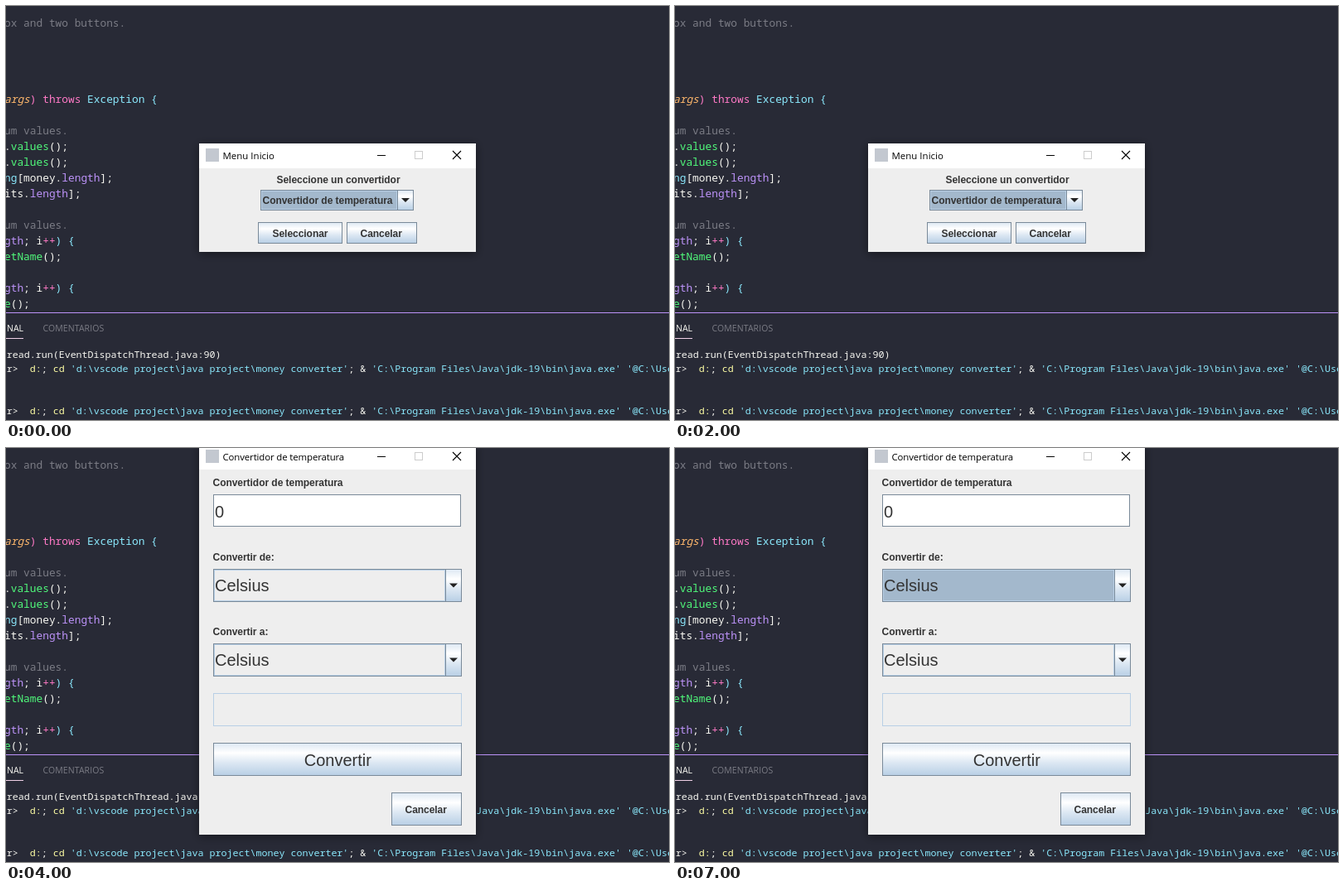
Recreate the animation shown at these times as an HTML page. Size 800x500 px, loop 8000 ms.

```html
<!DOCTYPE html>
<html lang="es">
<head>
<meta charset="utf-8">
<title>Convertidor</title>
<style>
  html, body { margin: 0; width: 100%; height: 100%; overflow: hidden; background: #282a36; }
  svg { display: block; width: 800px; height: 500px; }
  text { white-space: pre; }
  .code { font: 500 12.833px "Noto Sans Mono", monospace; }
  .term { font: 500 11.667px "Noto Sans Mono", monospace; }
  .tab { font: 10.5px "Open Sans", sans-serif; }
  .title { font: 11.4px "Open Sans", sans-serif; fill: #000; }
  .bold { font: bold 12px "Liberation Sans", Arial, sans-serif; fill: #333; letter-spacing: -.04px; }
  .big { font: 20px "Liberation Sans", Arial, sans-serif; fill: #333; }
</style>
</head>
<body>
<svg id="stage" viewBox="0 0 800 500">
  <defs>
    <linearGradient id="ocean" x1="0" y1="0" x2="0" y2="1">
      <stop offset="0" stop-color="#dde8f3"/>
      <stop offset=".3" stop-color="#fff"/>
      <stop offset=".6" stop-color="#dde8f3"/>
      <stop offset="1" stop-color="#b8cfe5"/>
    </linearGradient>
    <filter id="shadow" x="-20%" y="-20%" width="140%" height="140%">
      <feDropShadow dx="0" dy="2" stdDeviation="6" flood-color="#000" flood-opacity=".45"/>
    </filter>
  </defs>
</svg>
<script>
const stage = document.getElementById('stage');
const EDGE = '#7a8a99', PALE = '#b8cfe5', PICK = '#a3b8cc', PANEL = '#eeeeee';
const INK = {
  w: '#f8f8f2', c: '#8be9fd', g: '#50fa7b', p: '#ff79c6',
  v: '#bd93f9', o: '#ffb86c', y: '#ffffa5', m: '#7b7c85'
};

function make(parent, tag, attrs = {}, content) {
  const el = document.createElementNS('http://www.w3.org/2000/svg', tag);
  for (const key in attrs) el.setAttribute(key, attrs[key]);
  if (content !== undefined) el.textContent = content;
  parent.append(el);
  return el;
}

const group = (parent, attrs) => make(parent, 'g', attrs);
const fill = (parent, x, y, width, height, color) =>
  make(parent, 'rect', { x, y, width, height, fill: color });
const frame = (parent, x, y, w, h, stroke, inside = 'none') =>
  make(parent, 'rect', { x: x + .5, y: y + .5, width: w - 1, height: h - 1, fill: inside, stroke });
const label = (parent, cls, x, y, str, attrs = {}) =>
  make(parent, 'text', { class: cls, x, y, ...attrs }, str);

// Each run is [ink key, string]
function line(cls, x, y, ...runs) {
  const text = make(stage, 'text', { class: cls, x, y });
  for (const [ink, str] of runs) {
    const span = make(text, 'tspan', { fill: INK[ink] }, str);
    if (ink === 'o') span.setAttribute('font-style', 'italic');
  }
}

function drawEditor() {
  fill(stage, 0, 0, 800, 500, '#282a36');
  const code = (y, ...runs) => line('code', -2, y, ...runs);
  code(25, ['m', 'ox and two buttons.']);
  code(117, ['o', 'args'], ['p', ') throws '], ['c', 'Exception {']);
  for (const y of [155, 269]) code(y, ['m', 'um values.']);
  for (const y of [174, 193]) code(y, ['w', '.'], ['g', 'values'], ['w', '();']);
  code(212, ['c', 'ng'], ['w', '[money.'], ['v', 'length'], ['w', '];']);
  code(231, ['w', 'its.'], ['v', 'length'], ['w', '];']);
  for (const y of [288, 345]) code(y, ['v', 'gth'], ['w', '; i'], ['p', '++'], ['c', ') {']);
  code(307, ['g', 'etName'], ['w', '();']);
  code(364, ['g', 'e'], ['w', '();']);
}

function drawTerminal() {
  fill(stage, 0, 370, 800, 1, INK.v);
  label(stage, 'tab', 21, 393, 'NAL', { 'text-anchor': 'end', fill: INK.w });
  label(stage, 'tab', 44.5, 393, 'COMENTARIOS', { fill: INK.m, 'letter-spacing': .08 });
  fill(stage, 0, 401, 21, 1, '#f0d0e6');
  line('term', -6.3, 425, ['w', 'hread.run(EventDispatchThread.java:90)']);
  for (const y of [442, 493]) {
    line('term', -6.3, y, ['w', 'er>  '], ['y', 'd:'], ['w', '; '], ['y', 'cd '],
      ['c', "'d:\\vscode project\\java project\\money converter'"], ['w', '; & '],
      ['c', "'C:\\Program Files\\Java\\jdk-19\\bin\\java.exe' '@C:\\Users"]);
  }
}

function drawWindow(top, height, title, spacing) {
  const win = group(stage);
  make(win, 'rect', { x: 233, y: top, width: 334, height, fill: PANEL, filter: 'url(#shadow)' });
  fill(win, 233, top, 334, 30, '#fff');
  const bar = group(win, { transform: `translate(0 ${top})` });
  fill(bar, 241, 6, 16, 16, '#c3c8d0');
  label(bar, 'title', 261.5, 19, title, { 'letter-spacing': spacing });
  fill(bar, 448, 14, 10, 1, '#000');
  frame(bar, 493, 9, 10, 10, '#cccccc');
  make(bar, 'path', { d: 'M539 9l10 10m0 -10l-10 10', stroke: '#000', 'stroke-width': 1.1 });
  return win;
}

function button(parent, x, y, w, h) {
  return frame(parent, x, y, w, h, EDGE, 'url(#ocean)');
}

// Returns the value area so its highlight can be switched
function combo(parent, x, y, w, h) {
  const split = w - 20;
  frame(parent, x, y, split + 1, h, EDGE);
  frame(parent, x + 1, y + 1, split - 1, h - 2, PALE);
  const area = fill(parent, x + 2, y + 2, split - 3, h - 4, PANEL);
  button(parent, x + split, y, 20, h);
  make(parent, 'path', { d: `M${x + w - 15} ${y + h / 2 - 2.5}h10l-5 5z`, fill: '#222' });
  return area;
}

function popup(parent, cls, x, y, w, row, items, firstBase) {
  const list = group(parent);
  frame(list, x, y, w, row * items.length + 2, '#000', PANEL);
  fill(list, x + 1, y + 1, w - 2, row, PICK);
  items.forEach((item, i) => label(list, cls, x + 1.5, firstBase + i * row, item));
  return list;
}

function buildMenu() {
  const win = drawWindow(166, 131, 'Menu Inicio', .05);
  label(win, 'bold', 326.5, 214, 'Seleccione un convertidor');
  const area = combo(win, 307, 222, 185, 25);
  label(win, 'bold', 309.5, 239, 'Convertidor de temperatura');
  button(win, 304, 261, 102, 26);
  const hover = group(win);
  frame(hover, 304, 261, 102, 26, PALE);
  frame(hover, 305, 262, 100, 24, EDGE);
  frame(hover, 306, 263, 98, 22, PALE);
  label(win, 'bold', 321.5, 279, 'Seleccionar');
  button(win, 411, 261, 85, 26);
  label(win, 'bold', 427.5, 279, 'Cancelar');
  const list = popup(win, 'bold', 307, 247, 185, 18,
    ['Convertidor de temperatura', 'Convertidor de monedas'], 262);
  return { win, area, hover, list };
}

function buildConverter() {
  const win = drawWindow(-4, 471, 'Convertidor de temperatura', -.11);
  label(win, 'bold', 249.5, 46, 'Convertidor de temperatura');
  frame(win, 250, 56, 299, 39, EDGE, '#fff');
  label(win, 'big', 252, 84, '0');
  label(win, 'bold', 249.5, 136, 'Convertir de:');
  const area = combo(win, 250, 146, 300, 40);
  label(win, 'big', 252, 173, 'Celsius');
  label(win, 'bold', 249.5, 226, 'Convertir a:');
  combo(win, 250, 236, 300, 40);
  label(win, 'big', 252, 263, 'Celsius');
  frame(win, 250, 296, 300, 40, PALE);
  button(win, 250, 356, 300, 40);
  label(win, 'big', 400.3, 384, 'Convertir', { 'text-anchor': 'middle' });
  button(win, 465, 416, 85, 40);
  label(win, 'bold', 481.5, 441, 'Cancelar');
  const list = popup(win, 'big', 250, 186, 300, 28, ['Celsius', 'Fahrenheit', 'Kelvin'], 209);
  return { win, area, list };
}

drawEditor();
drawTerminal();
const menu = buildMenu();
const converter = buildConverter();

const show = (el, on) => el.setAttribute('visibility', on ? 'inherit' : 'hidden');
const pick = (el, on) => el.setAttribute('fill', on ? PICK : PANEL);

function render(ms) {
  const t = ms % 8000;
  const inMenu = t < 4000;
  const menuOpen = t >= 1000 && t < 2000;
  menu.win.setAttribute('display', inMenu ? 'inline' : 'none');
  converter.win.setAttribute('display', inMenu ? 'none' : 'inline');
  show(menu.list, menuOpen);
  pick(menu.area, !menuOpen);
  show(menu.hover, t >= 3000);
  show(converter.list, t >= 6000 && t < 7000);
  pick(converter.area, t >= 7000);
}

const start = performance.now();
function tick() {
  render(performance.now() - start);
  requestAnimationFrame(tick);
}
tick();
</script>
</body>
</html>
```
